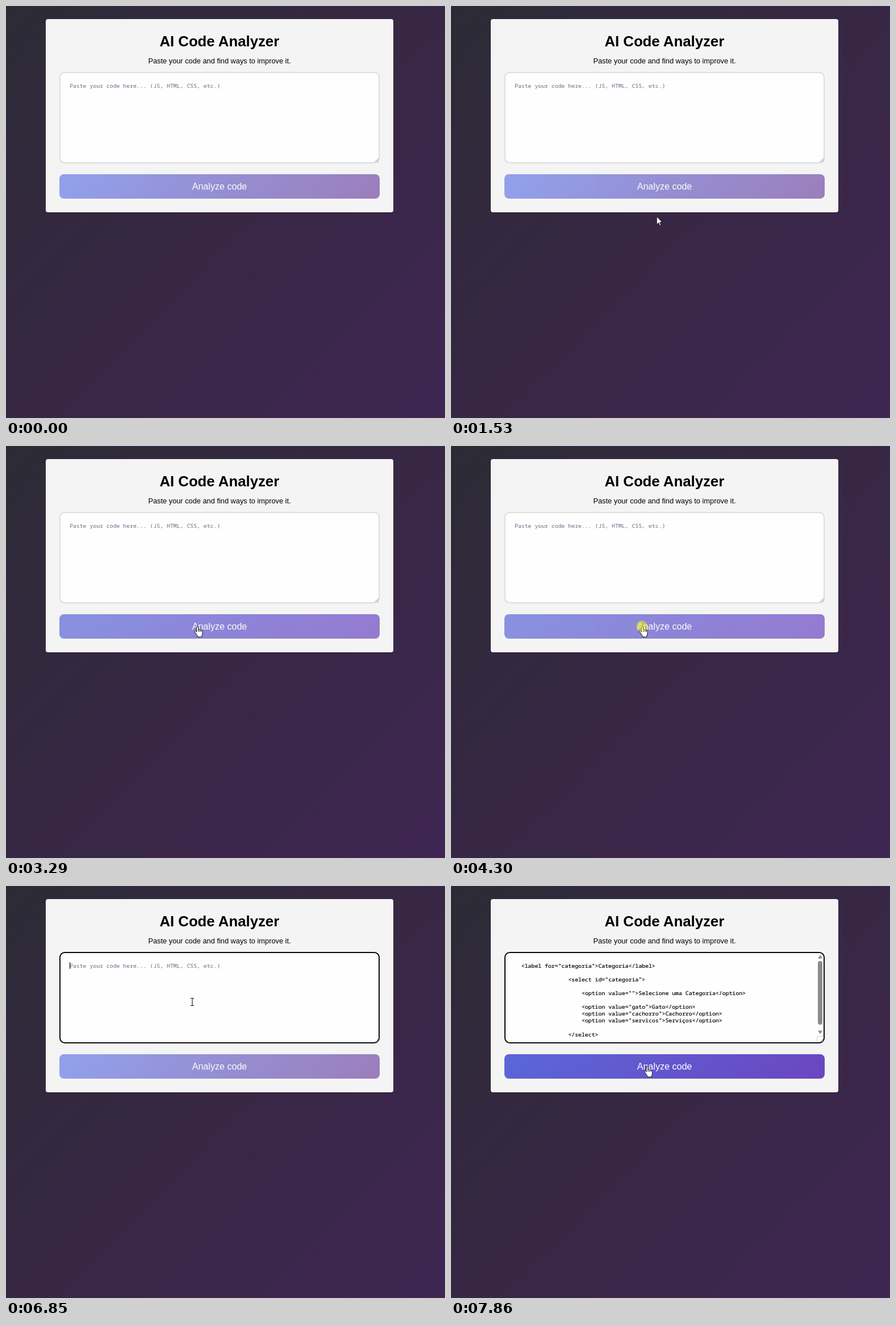
These frames come from a looping animation (773 px wide and 725 px high, 7990 ms). An HTML page:

```html
<!DOCTYPE html>
<html lang="en">
<head>
<meta charset="utf-8">
<title>AI Code Analyzer</title>
<style>
  html, body { margin: 0; width: 100%; height: 100%; overflow: hidden; background: #372744; }
  svg { display: block; width: 773px; height: 725px; }
  text { font-family: "Liberation Sans", Arial, sans-serif; }
  .mid { text-anchor: middle; }
  .mono, .mono text { font: 9.83px "Noto Sans Mono", "DejaVu Sans Mono", monospace; }
  .mono text { stroke: #000; stroke-width: .2px; }
</style>
</head>
<body>
<svg viewBox="0 0 773 725" xmlns="http://www.w3.org/2000/svg">
  <defs>
    <linearGradient id="page" gradientUnits="userSpaceOnUse" x1="12" y1="-12" x2="761" y2="737">
      <stop stop-color="#2c2b35"/><stop offset=".5" stop-color="#372744"/><stop offset="1" stop-color="#3f2653"/>
    </linearGradient>
    <linearGradient id="idle" gradientUnits="userSpaceOnUse" x1="224.25" y1="165.75" x2="527.75" y2="469.25">
      <stop stop-color="#667eea"/><stop offset="1" stop-color="#764ba2"/>
    </linearGradient>
    <linearGradient id="hover" href="#idle">
      <stop stop-color="#5a67d8"/><stop offset="1" stop-color="#6b46c1"/>
    </linearGradient>
  </defs>

  <rect width="773" height="725" fill="url(#page)"/>
  <rect x="70" y="23" width="612" height="340" rx="4" fill="#f4f4f4"/>
  <text class="mid" x="375.8" y="71" font-size="25.75" font-weight="700">AI Code Analyzer</text>
  <text class="mid" x="376" y="101" font-size="12.8">Paste your code and find ways to improve it.</text>

  <rect id="box" x="95" y="117" width="562" height="159" rx="8.6" fill="#fefefe" stroke-width="2"/>
  <text id="hint" class="mono" x="112" y="143.6" fill="#6a6a86">Paste your code here... (JS, HTML, CSS, etc.)</text>
  <g id="code" class="mono">
    <g fill="#8b8b8b">
      <path d="M650 121.5l4 6h-8zM650 260.5l4-6h-8z"/>
      <rect x="646" y="132" width="8" height="112" rx="4"/>
    </g>
    <path d="M656 264.5H644.5V275" fill="none" stroke="#d9cbe2"/>
  </g>
  <path d="M649.5 275L656 268.5M653 275L656 272" stroke="#777" stroke-width=".9"/>
  <rect id="caret" width="1" height="12"/>

  <g id="button">
    <rect id="face" x="94" y="296" width="564" height="43" rx="8"/>
    <text class="mid" x="376" y="323" font-size="16.1" fill="#fff">Analyze code</text>
  </g>

  <g id="cursor" fill="#fff" stroke="#111" stroke-linejoin="round">
    <path id="arrow" d="M.5 .5V14.5L3.8 11.4 6 16.4 8.2 15.5 6 10.6H10.3Z" stroke-width=".9"/>
    <g id="hand">
      <path d="M-1.5 2Q-1.5 .5 0 .5T1.5 2V6.5Q1.8 5.6 3 5.7T4.2 7.2Q4.6 6.4 5.7 6.6T6.8 8Q7.3 7.4 8.2 7.7T9 9.2V13Q9 15 7.8 16.8V19H0V17Q-1 15.5 -2.6 13L-5 9.8Q-5.4 8.5 -4.4 8.2T-2.6 9L-1.5 10.3Z"/>
      <path d="M1.5 6.5V10M4.2 7.2V10M6.8 8V10" fill="none"/>
    </g>
    <path id="beam" d="M-3-6.5H-1L0-6 1-6.5H3M-3 6.5H-1L0 6 1 6.5H3M0-6V6" fill="none" stroke-width="1.1"/>
  </g>
  <circle id="click" r="9.7" fill="#ff0" fill-opacity=".47"/>
</svg>
<script>
const LOOP = 7990, FOCUS = 5790, PASTE = 6920, BLINK = 530;
const COL = 5.9, LINE = 12.1, SAMPLE = 69;
const $ = id => document.getElementById(id);
const show = (id, on) => $(id).setAttribute("visibility", on ? "visible" : "hidden");
const set = (id, attrs) => {
  for (const name in attrs) $(id).setAttribute(name, attrs[name]);
};

const snippet = `  <label for="categoria">Categoria</label>

                <select id="categoria">

                    <option value="">Selecione uma Categoria</option>

                    <option value="gato">Gato</option>
                    <option value="cachorro">Cachorro</option>
                    <option value="servicos">Serviços</option>

                </select>`;
snippet.split("\n").forEach((line, row) => {
  if (!line) return;
  const el = document.createElementNS("http://www.w3.org/2000/svg", "text");
  el.setAttribute("x", 112 + line.search(/\S/) * COL);
  el.setAttribute("y", 143.6 + row * LINE);
  el.textContent = line.trim();
  $("code").append(el);
});

// Pointer moves; ease holds the ease-out power for x and y
const moves = [
  { start: 360, end: 2020, from: [709, 714], to: [347, 316], ease: [2.6, 1.62] },
  { start: 2350, end: 2690, from: [347, 322], to: [347, 348], ease: [1, 2.8] },
  { start: 2950, end: 3290, from: [346, 345], to: [337, 317], ease: [1, 1] },
  { start: 4960, end: 5720, from: [336, 312], to: [328, 204], ease: [2.3, 1.14] },
  { start: 7320, end: 7860, from: [329, 210], to: [345.5, 317], ease: [1, 1] }
];
const clicks = [[3560, 3690], [3970, 4040], [4300, 4430], [FOCUS, 5930]];

function pointer(t) {
  const move = moves.findLast(m => m.start <= t);
  if (!move) return null;
  const { start, end, from, to, ease } = move;
  // The pointer is sampled at a low, slightly uneven rate
  const count = Math.round((end - start) / SAMPLE);
  const step = Math.floor((t - start + 8) / (end - start) * count);
  const left = 1 - Math.min(1, step / count);
  return from.map((a, i) => to[i] + (a - to[i]) * left ** ease[i]);
}

// The blink starts again when text is pasted
function caretOn(t) {
  if (t < FOCUS) return false;
  const since = t < PASTE ? FOCUS : PASTE;
  return Math.floor((t - since) / BLINK) % 2 === 0;
}

function render(t) {
  const pos = pointer(t), pasted = t >= PASTE;
  const [x, y] = pos || [0, 0];
  const over = pos && y >= 296 && y < 339;
  const inBox = pos && y >= 116 && y < 277;

  set("box", { stroke: t >= FOCUS ? "#0b0b0b" : "#dedede" });
  show("hint", !pasted);
  show("code", pasted);
  show("caret", caretOn(t));
  set("caret", pasted ? { x: 259, y: 255 } : { x: 112, y: 134 });

  set("face", { fill: over ? "url(#hover)" : "url(#idle)" });
  set("button", { opacity: pasted ? 1 : .7 });

  set("cursor", { transform: `translate(${x} ${y})` });
  show("arrow", pos && !over && !inBox);
  show("hand", over);
  show("beam", inBox);
  show("click", clicks.some(([on, off]) => t >= on && t < off));
  set("click", { cx: x - 1, cy: y });
}

const begin = performance.now();
function tick() {
  render((performance.now() - begin) % LOOP);
  requestAnimationFrame(tick);
}
render(0);
requestAnimationFrame(tick);
</script>
</body>
</html>
```
